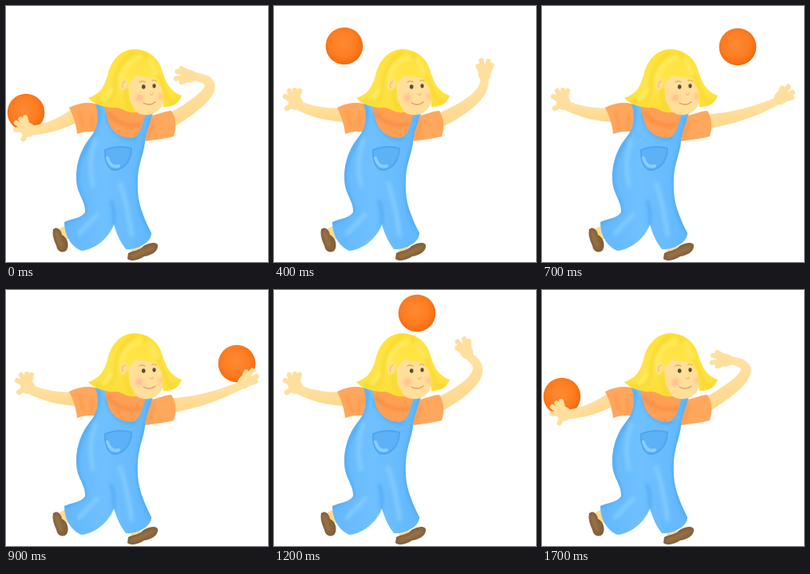
Write an HTML page that moves like this. It is 328 px wide and 320 px high and loops after 1800 ms.

```html
<!DOCTYPE html>
<html lang="en">
<head>
<meta charset="utf-8">
<title>Girl tossing a ball</title>
<style>
html, body { margin: 0; height: 100%; overflow: hidden; background: #fff; }
svg { display: block; width: 328px; height: 320px; }
.line { fill: none; stroke-linecap: round; stroke-linejoin: round; }
.skin { fill: url(#skin); }
.fingers { fill: none; stroke: #ffdf9e; stroke-width: 6.2; stroke-linecap: round; }
.soft { filter: url(#blur); }
</style>
</head>
<body>
<svg viewBox="0 0 328 320">
<defs>
  <filter id="blur" x="-30%" y="-30%" width="160%" height="160%"><feGaussianBlur stdDeviation="2.2"/></filter>
  <filter id="smudge" x="-30%" y="-30%" width="160%" height="160%"><feGaussianBlur stdDeviation=".6"/></filter>
  <radialGradient id="rubber" cx=".46" cy=".43" r=".57">
    <stop offset="0" stop-color="#ff8a34"/><stop offset=".65" stop-color="#fd7c20"/><stop offset="1" stop-color="#f26a10"/>
  </radialGradient>
  <linearGradient id="skin" x2="0" y2="1"><stop stop-color="#ffe2a4"/><stop offset="1" stop-color="#ffd78c"/></linearGradient>
  <linearGradient id="denim"><stop stop-color="#62b7fb"/><stop offset=".45" stop-color="#6fc0ff"/><stop offset="1" stop-color="#62b7fb"/></linearGradient>
  <linearGradient id="hair" x2="0" y2="1"><stop stop-color="#ffe138"/><stop offset=".5" stop-color="#ffe54a"/><stop offset="1" stop-color="#fcdd36"/></linearGradient>
  <path id="trousers" d="M112 123L122 122C126 134 126 143 131 152C137 160 146 165 157 165C168 163 170 150 175 134L184 132C181 146 175 156 174 169C173 183 166 196 165 214C164 234 166 246 171 259C174 268 178 276 182 284C182 296 164 305 150 304C143 295 138 284 135 273C130 288 113 304 95 306C83 302 73 288 73 270C82 266 93 266 99 258C100 246 92 238 89 225C86 208 90 190 97 177C101 169 108 162 111 156C116 145 116 134 112 123Z"/>
  <path id="locks" d="M161 54C180 55 191 66 195 79C200 95 205 107 220 112C217 121 209 127 197 126L195 103L187 91L163 87L153 98L155 118L163 133C152 134 147 129 139 127C125 128 110 123 103 115C118 110 123 101 127 87C131 69 143 54 161 54Z"/>
  <clipPath id="inTrousers"><use href="#trousers"/></clipPath>
  <clipPath id="inLocks"><use href="#locks"/></clipPath>
</defs>

<circle id="ball" r="23.3" fill="url(#rubber)"/>

<g id="leftArm">
  <path class="skin" d="M90 127C70 129 51 126 36 120L29 130C45 138 65 144 90 145Z"/>
  <ellipse cx="27" cy="121" rx="9" ry="9" fill="#ffdf9e"/>
  <path class="fingers" d="M24 119L14 113M24 117L19 106M27 117L26 105M29 117L32 106M24 123L16 128"/>
</g>

<g id="rightArm">
  <path class="skin" id="sleeveToWrist"/>
  <g id="rightHand">
    <ellipse cx="7" rx="10.5" ry="8" fill="#ffdf9e"/>
    <path class="fingers" d="M8 -4L16 -8M9 -1L23 -4M9 2L22 5M7 4L17 9"/>
  </g>
</g>

<path d="M67 278L76 274L80 292L71 290ZM155 300L170 300L165 307L157 307Z" fill="#ffdc90"/>
<path d="M59 279C64 275 69 279 70 286C76 289 79 296 77 303C75 309 67 309 64 303C63 297 57 290 59 279Z" fill="#84603c"/>
<path d="M153 309C159 305 166 307 172 300C180 296 188 294 190 299C191 307 181 312 173 313C165 318 156 320 152 316Z" fill="#84603c"/>
<path class="line soft" d="M63 283L69 300M158 313L184 302" stroke="#9f7a4a" stroke-width="4"/>

<path d="M112 122L185 130L176 160L160 170L118 160Z" fill="#ff9f55"/>
<path class="line soft" d="M128 134Q144 153 168 148" stroke="#f68c40" stroke-width="4"/>
<g fill="#ffa75c">
  <path d="M79 127C91 121 102 120 112 122C118 134 116 146 111 157L105 157C99 157 94 158 89 160C88 148 84 137 79 127Z"/>
  <path d="M181 137C189 136 199 131 207 131C214 142 213 154 210 163C199 166 187 167 174 169C174 157 179 149 181 137Z"/>
</g>
<path class="line soft" d="M92 132L97 152M108 136L107 153M184 145L178 164" stroke="#f8964a" stroke-width="3"/>

<use href="#trousers" fill="url(#denim)"/>
<g clip-path="url(#inTrousers)">
  <path class="line soft" d="M115 124C124 150 91 179 89 209S101 243 99 258L73 272M181 140C174 180 163 198 165 230S174 270 182 284M135 273Q136 256 132 244M126 135Q134 168 162 165" stroke="#4ba6f0" stroke-width="3"/>
  <path class="line soft" d="M112 168Q102 195 109 224M143 222Q153 252 157 286M114 261L92 284" stroke="#80caff" stroke-width="6"/>
</g>
<path d="M124 180Q141 173 157 177C158 190 153 200 143 204C132 208 125 194 124 180Z" fill="#5cb1f7"/>
<g class="line" filter="url(#smudge)">
  <path d="M124 180C123 196 130 206 138 205C148 203 157 193 157 178Q140 173 124 180" stroke="#50a6ee" stroke-width="2"/>
  <path d="M127 190Q131 203 141 200" stroke="#88cdff" stroke-width="4"/>
</g>

<path d="M153 94C164 80 181 82 192 91C197 103 201 119 193 128C185 138 169 139 160 130C153 121 150 106 153 94Z" fill="#ffdf9a"/>
<g class="soft" fill="#ffc090"><circle cx="167" cy="115" r="5"/><circle cx="194" cy="113" r="3.5"/></g>
<use href="#locks" fill="url(#hair)"/>
<g clip-path="url(#inLocks)" class="line">
  <path class="soft" d="M160 57Q137 76 136 101T112 119M172 59Q190 80 198 104T213 118M151 103Q147 117 157 130" stroke="#f6d42c" stroke-width="3"/>
  <path class="soft" d="M168 64Q147 72 144 91M179 67L188 84M131 105L123 117" stroke="#ffec66" stroke-width="5"/>
</g>
<ellipse cx="147" cy="98" rx="5" ry="8" fill="#ffe088" transform="rotate(12 147 98)"/>
<g filter="url(#smudge)">
  <path class="line" d="M149 94Q144 96 146 102" stroke="#f0c470" stroke-width="1.4"/>
  <g fill="#5c4e32"><ellipse cx="172.2" cy="101" rx="2.3" ry="2.8"/><ellipse cx="185.5" cy="100" rx="2.1" ry="2.7"/></g>
  <g class="line" stroke-width="1.4">
    <path d="M167 95Q170 93 174 95M183 93Q186 92 188 94" stroke="#dcb45c"/>
    <path d="M180 110Q183 113 184 109" stroke="#f0be80"/>
    <path d="M172 121Q180 126 187 120" stroke="#e39a68"/>
  </g>
</g>
</svg>

<script>
const STEP = 100;
const get = id => document.getElementById(id);
const mix = (a, b, k) => a.map((v, i) => v + (b[i] - v) * k);

// Ball centre at every step of the loop.
const ballPath = [
  [25, 133], [28, 119], [33, 105], [54, 75], [88, 50], [127, 35],
  [187, 31], [245, 51], [273, 73], [289, 92], [277, 78], [232, 44],
  [179, 29], [125, 34], [82, 51], [46, 80], [32, 108], [25, 133]
];

// Right arm poses: two curve controls, wrist, direction of the hand.
const curled = [250, 118, 275, 94, 236, 88, -177];
const raised = [245, 124, 271, 100, 244, 83, -118];
const reach = [235, 132, 258, 122, 283, 99, -62];
const level = [235, 141, 262, 134, 294, 119, -42];

const armKeys = [
  [0, curled], [2, curled], [3, raised], [5, reach], [6, level],
  [9, level], [10, reach], [12, raised], [14, curled], [17, curled]
];
const leftKeys = [[0, [-31]], [2, [0]], [15, [0]], [17, [-31]]];

function sample(keys, step) {
  const i = Math.max(1, keys.findIndex(key => key[0] >= step));
  const [from, a] = keys[i - 1], [to, b] = keys[i];
  return mix(a, b, (step - from) / (to - from));
}

// Outline of a cubic curve whose width tapers from shoulder to wrist.
function limb(points) {
  const near = [], far = [];
  for (let i = 0; i <= 16; i++) {
    const t = i / 16, u = 1 - t;
    const [p, q, r, s] = points;
    const at = n => u * u * u * p[n] + 3 * u * u * t * q[n] + 3 * u * t * t * r[n] + t * t * t * s[n];
    const slope = n => u * u * (q[n] - p[n]) + 2 * u * t * (r[n] - q[n]) + t * t * (s[n] - r[n]);
    const dx = slope(0), dy = slope(1), half = (9 - 4 * t) / Math.hypot(dx, dy);
    near.push([at(0) - dy * half, at(1) + dx * half]);
    far.unshift([at(0) + dy * half, at(1) - dx * half]);
  }
  return "M" + near.concat(far).join("L") + "Z";
}

function draw(step) {
  get("ball").setAttribute("transform", `translate(${ballPath[step]})`);
  get("leftArm").setAttribute("transform", `rotate(${sample(leftKeys, step)} 88 137)`);
  const [ax, ay, bx, by, x, y, angle] = sample(armKeys, step);
  get("sleeveToWrist").setAttribute("d", limb([[203, 145], [ax, ay], [bx, by], [x, y]]));
  get("rightHand").setAttribute("transform", `translate(${x} ${y}) rotate(${angle})`);
}

const start = performance.now();
function tick() {
  draw(Math.floor((performance.now() - start) / STEP) % ballPath.length);
  requestAnimationFrame(tick);
}
tick();
</script>
</body>
</html>
```
